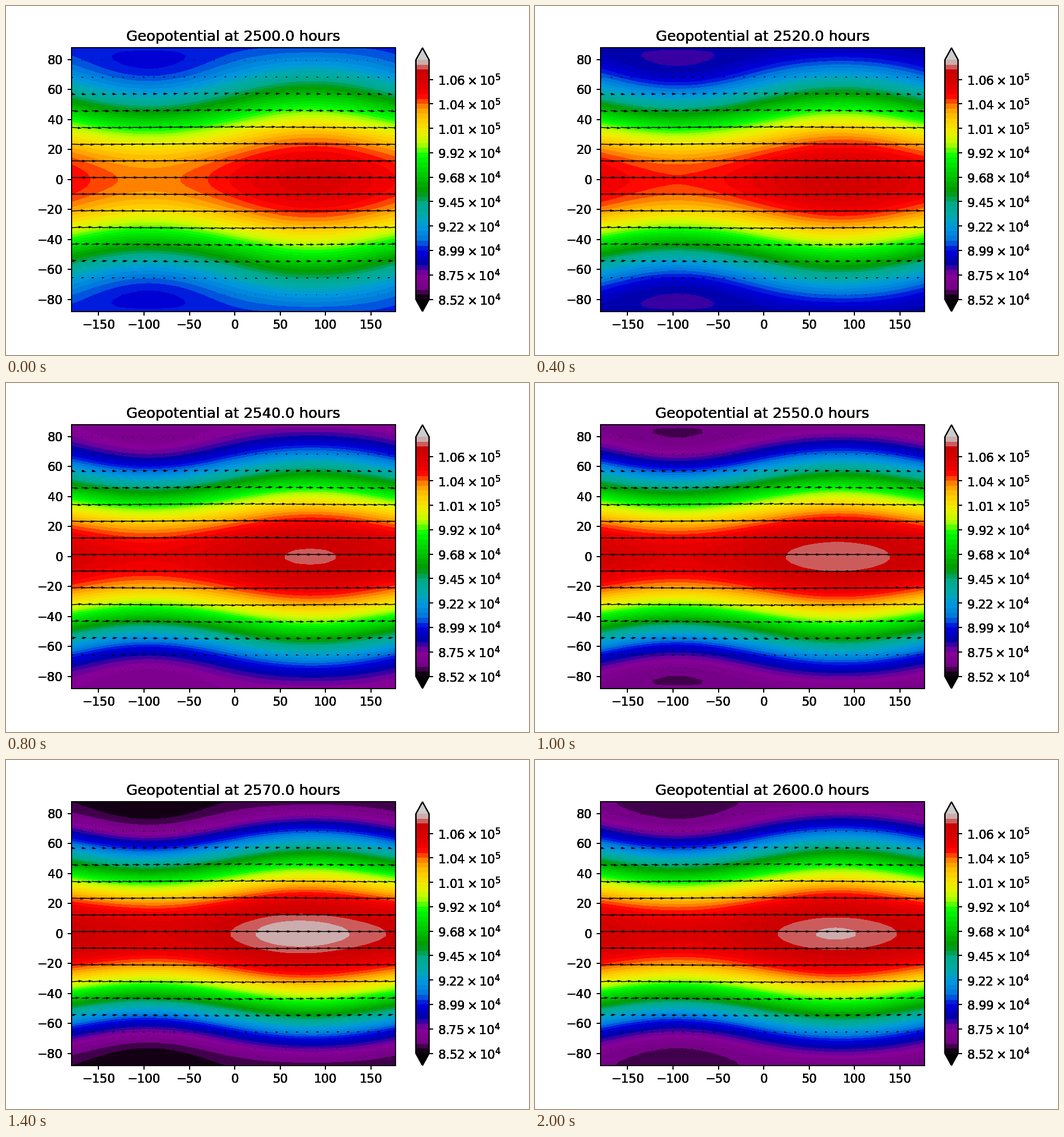
A matplotlib script that plays this animation: 917x611 px, repeating every 2.2 s.

```python
import numpy as np
import matplotlib.pyplot as plt
from matplotlib.animation import FuncAnimation
from matplotlib.artist import Artist

DPI = 152.75
FRAMES, INTERVAL = 11, 200
LEVELS = np.arange(50)
BASE, STEP = 85220, 464.4      # value of the lowest contour, spacing

# Gaussian grid
MU = np.polynomial.legendre.leggauss(64)[0]
LAT = np.degrees(np.arcsin(MU))
LON = -180 + 2.8125 * np.arange(128)
X, Y = np.meshgrid(LON, LAT)
S = np.sin(np.radians(Y)) ** 2
C = np.sqrt(1 - S)
MID = S ** 2 * (1 - S)         # weight of the middle latitudes


def geopotential(hours):
    """Field in contour units: zonal mean plus one slow planetary wave."""
    s = np.sin(2 * np.pi * (hours - 30) / 188)
    equator = 44.3 + 2.65 * s
    pole = 5.7 - 5.4 * s + 0.52 * s ** 2
    mean = equator - (equator - pole) * S * (0.9 + 0.1 * S) - 4 * MID

    amp = C * (2.2 - 0.35 * s + 9.5 * S
               - (3 - 1.1 * s) * S * (1 - S) ** 2
               + (4 * s - 2) * MID)
    crest = 84 - 2 * s
    lon = np.radians(X - crest - (85 - crest) * S)
    skew = 0.12 * max(s, 0) ** 4 * (1 - S) ** 4
    return mean + amp * (np.cos(lon) - skew * np.sin(2 * lon))


def wind():
    u = C ** 2
    v = -0.06 * np.sin(np.radians(2 * Y)) * np.sin(np.radians(X - 84))
    return u, v


def sci_label(value):
    power = int(np.floor(np.log10(value)))
    return rf"${value / 10 ** power:.2f}\times10^{{{power}}}$"


class Overprint(Artist):
    """Prints text, ticks and frames again, which hardens their edges."""
    zorder = 10

    def draw(self, renderer):
        for ax in self.figure.axes:
            parts = [ax.title, ax.xaxis, ax.yaxis, *ax.spines.values()]
            for part in parts * 5:
                part.draw(renderer)


fig, ax = plt.subplots(figsize=((917 + 1e-6) / DPI, (611 + 1e-6) / DPI),
                       dpi=DPI)
fig.subplots_adjust(left=0.125, right=0.9, bottom=0.125, top=0.88)
U, V = wind()
GRID = (slice(None, None, 4), slice(None, None, 4))


def draw(i):
    hours = 10 * i
    ax.clear()
    fill = ax.contourf(X, Y, geopotential(hours), levels=LEVELS,
                       cmap="nipy_spectral", extend="both")
    ax.quiver(X[GRID], Y[GRID], U[GRID], V[GRID])
    ax.set_xlim(LON[0], LON[-1])
    ax.set_ylim(LAT[0], LAT[-1])
    ax.set_xticks(range(-150, 151, 50))
    ax.set_yticks(range(-80, 81, 20))
    ax.set_title(f"Geopotential at {2500 + hours:.1f} hours")
    return fill


bar = fig.colorbar(draw(0), ax=ax)
bar.set_ticks(LEVELS[::5],
              labels=[sci_label(BASE + STEP * k) for k in LEVELS[::5]])
fig.add_artist(Overprint())


def update(i):
    draw(i)
    return []


anim = FuncAnimation(fig, update, frames=FRAMES, interval=INTERVAL,
                     init_func=lambda: update(0), repeat=True,
                     repeat_delay=0, blit=False)
plt.show()
```
